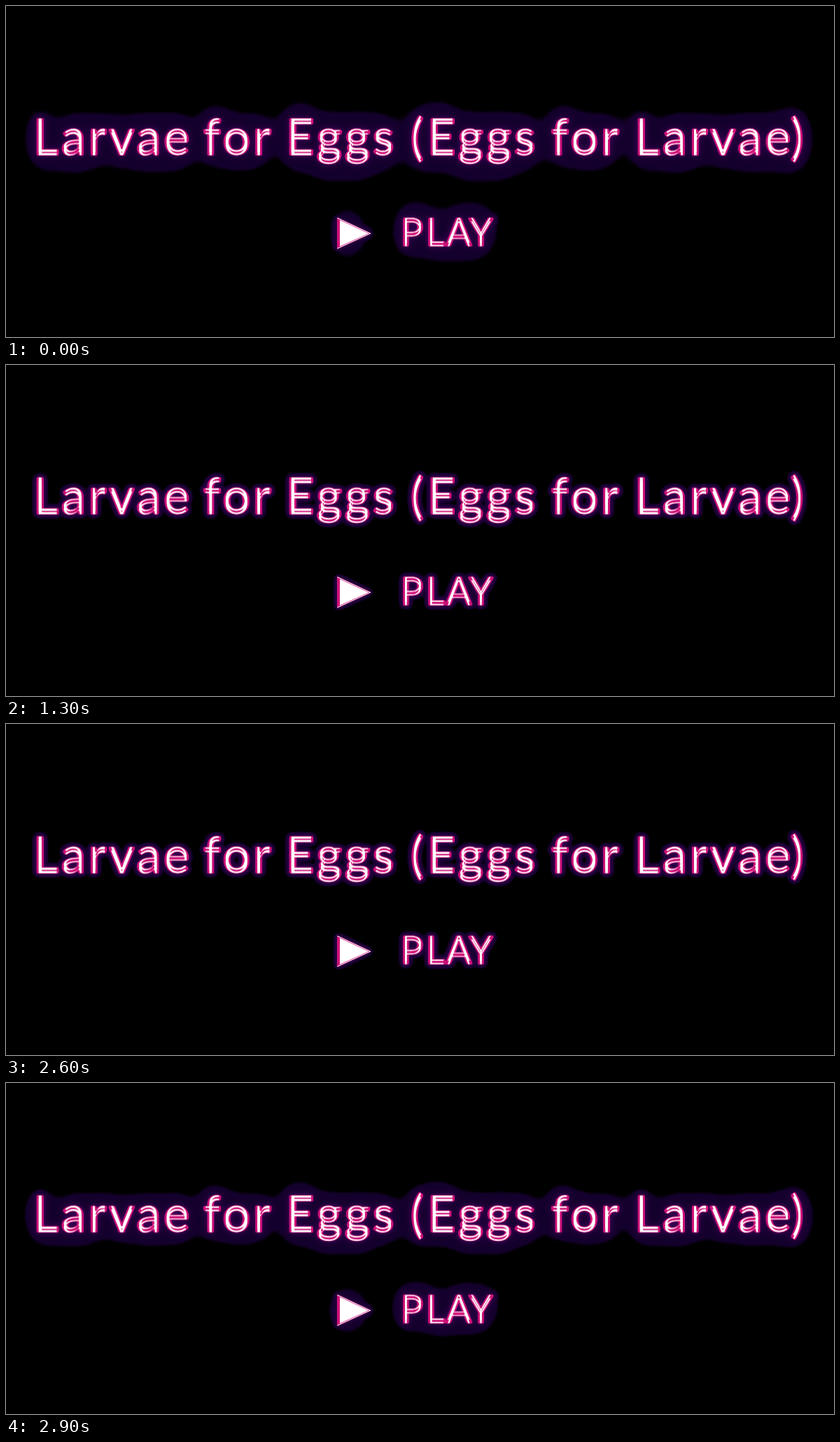
Animation, 1183 px wide and 473 px high, one loop 3 s. Source, as an HTML page with a canvas:

```html
<!DOCTYPE html>
<html lang="en">
<head>
<meta charset="utf-8">
<title>Neon title</title>
<style>
  html, body { margin: 0; width: 100%; height: 100%; overflow: hidden; background: #000; }
  canvas { display: block; }
</style>
</head>
<body>
<canvas id="stage" width="1183" height="473"></canvas>
<script>
const W = 1183, H = 473, LOOP = 3000;
const PINK = '#d01278';
const stage = document.getElementById('stage').getContext('2d');

// text, left edge of the ink, baseline, font size
const items = [
  ['Larvae', 45, 212, 70], ['for', 283, 212, 70], ['Eggs', 406, 212, 70],
  ['(', 581, 212, 70], ['Eggs', 608, 212, 70], ['for', 780, 212, 70],
  ['Larvae', 904, 212, 70], [')', 1123, 212, 70],
  ['P', 568, 342, 53], ['L', 604, 342, 53], ['A', 629, 342, 53], ['Y', 662, 342, 53]
];

// near blur, then the wide blur across and down, strongest first
const glows = [
  [5.2, 16, 24], [5.2, 15, 19], [5, 9, 12],
  [4.7, 4.7, 4.7], [3.8, 3.8, 3.8], [2.8, 2.8, 2.8], [2.1, 2.1, 2.1]
];

function layer(w = W, h = H) {
  const c = document.createElement('canvas');
  c.width = w;
  c.height = h;
  return c.getContext('2d', { willReadFrequently: true });
}

function eachText(g, paint) {
  g.lineJoin = 'round';
  for (const [text, left, y, size] of items) {
    g.font = `400 ${size}px Lato, "Open Sans", sans-serif`;
    g.letterSpacing = '4px';
    const x = left + g.measureText(text).actualBoundingBoxLeft;
    paint(text, x, y);
  }
}

function triangle(g, left, top, tip, bottom) {
  g.beginPath();
  g.moveTo(left, top);
  g.lineTo(tip, 325);
  g.lineTo(left, bottom);
  g.closePath();
}

function drawTubes() {
  const g = layer();
  g.fillStyle = g.strokeStyle = PINK;
  g.lineWidth = 3.4;
  eachText(g, (s, x, y) => { g.strokeText(s, x, y); g.fillText(s, x, y); });
  return g.canvas;
}

// thinned letters: stacked twice they give the white highlights
function drawCore() {
  const g = layer();
  g.fillStyle = '#fff';
  eachText(g, (s, x, y) => g.fillText(s, x, y));
  g.globalCompositeOperation = 'destination-out';
  g.lineWidth = 2.7;
  eachText(g, (s, x, y) => g.strokeText(s, x, y));
  return g.canvas;
}

function drawSign(tubes) {
  const g = layer();
  const core = drawCore();
  g.drawImage(tubes, 0, 0);
  g.drawImage(core, 0, -2.4);
  g.drawImage(core, 0, 2.4);

  g.fillStyle = g.strokeStyle = PINK;
  triangle(g, 473, 302, 522, 347.5);
  g.fill();
  g.strokeStyle = '#fff';
  g.lineWidth = 1;
  g.beginPath();
  g.moveTo(473.5, 303);
  g.lineTo(520.5, 325);
  g.lineTo(473.5, 346.5);
  g.stroke();
  g.fillStyle = '#fff';
  triangle(g, 477, 306, 518, 343.5);
  g.fill();
  return g.canvas;
}

function drawMask(tubes) {
  const g = layer();
  g.drawImage(tubes, 0, 0);
  g.globalAlpha = 0.55;
  triangle(g, 473, 302, 522, 347.5);
  g.fill();
  return g.canvas;
}

// an uneven blur is an even one on a squashed copy
function blurred(mask, sx, sy) {
  const h = Math.round(H * sx / sy);
  const flat = layer(W, h);
  flat.filter = `blur(${sx}px)`;
  flat.drawImage(mask, 0, 0, W, h);
  const g = layer();
  g.drawImage(flat.canvas, 0, 0, W, H);
  return g.getImageData(0, 0, W, H);
}

const ramp = (v, from, to) => Math.max(0, Math.min(1, (v - from) / (to - from)));

// short ramps give the halo its firm edge
function drawHalo(mask, [near, sx, sy]) {
  const img = blurred(mask, near, near), d = img.data;
  const wide = blurred(mask, sx, sy).data;
  for (let i = 0; i < d.length; i += 4) {
    const v = d[i + 3];
    const heat = ramp(v, 0, 160);
    const cover = Math.max(ramp(v, 4, 16), ramp(wide[i + 3], 19, 27));
    d[i] = 20 + 26 * heat;
    d[i + 1] = 0;
    d[i + 2] = 44 + 30 * heat;
    d[i + 3] = 255 * cover;
  }
  const g = layer();
  g.putImageData(img, 0, 0);
  return g.canvas;
}

const tubes = drawTubes();
const sign = drawSign(tubes);
const mask = drawMask(tubes);

const states = glows.map(spread => {
  const g = layer();
  g.fillStyle = '#000';
  g.fillRect(0, 0, W, H);
  g.drawImage(drawHalo(mask, spread), 0, 0);
  g.shadowColor = 'rgba(130, 0, 110, 0.4)';
  g.shadowBlur = 4;
  g.drawImage(sign, 0, 0);
  return g.canvas;
});

function stateAt(t) {
  if (t < 1000) return 0;
  if (t < 1500) return 1 + Math.floor((t - 1000) / 100);
  if (t < 2500) return 6;
  return 5 - Math.floor((t - 2500) / 100);
}

const start = performance.now();
function tick() {
  const t = (performance.now() - start) % LOOP;
  stage.drawImage(states[stateAt(t)], 0, 0);
  requestAnimationFrame(tick);
}
tick();
</script>
</body>
</html>
```
